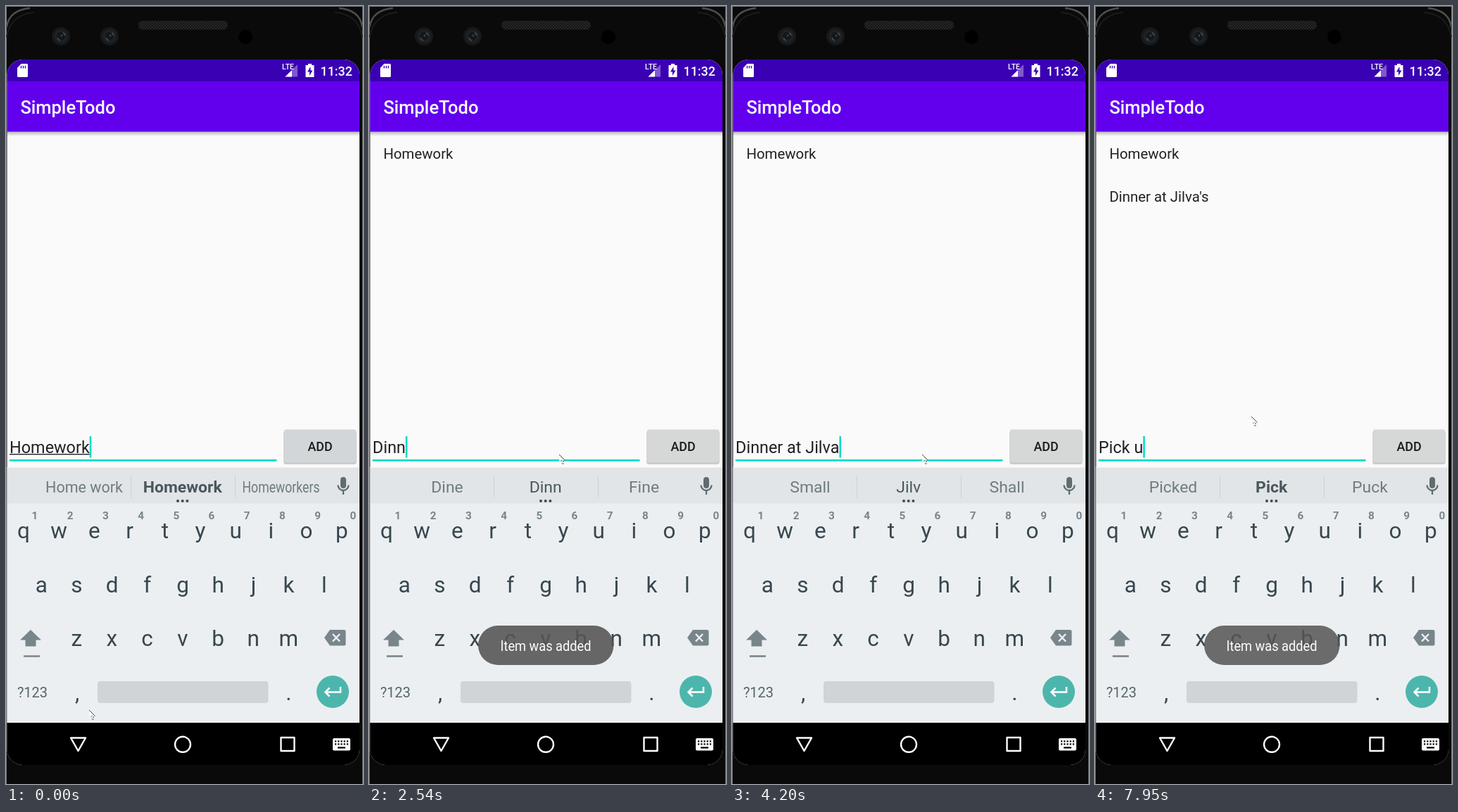
These frames come from a looping animation (507 px wide and 1105 px high, 8000 ms). An HTML page:

```html
<!DOCTYPE html>
<html lang="en">
<head>
<meta charset="utf-8">
<title>SimpleTodo</title>
<style>
  html, body { margin: 0; width: 100%; height: 100%; overflow: hidden; background: #0a0a0a; }
  svg { display: block; width: 100%; height: 100%; }
  text { font-family: Roboto, "Noto Sans", sans-serif; white-space: pre; }
  .mid { text-anchor: middle; }
  .med { font-weight: 500; }
  .key { font-size: 31.5px; fill: #37474f; }
  .num { font-size: 15.3px; font-weight: 700; fill: #78848a; }
  .item { font-size: 20.4px; fill: #212121; }
  .field { font-size: 23.4px; fill: #212121; }
  .sug { font-size: 22.96px; fill: #6f7b80; }
  .nav { fill: none; stroke: #fff; stroke-width: 2.4; stroke-linejoin: round; }
</style>
</head>
<body>
<svg viewBox="0 0 507 1105" preserveAspectRatio="none">
  <defs>
    <clipPath id="screen"><rect x="1.5" y="76" width="500.5" height="1002" rx="22"/></clipPath>
    <linearGradient id="shade" x2="0" y2="1">
      <stop stop-color="#000" stop-opacity=".28"/><stop offset="1" stop-color="#000" stop-opacity="0"/>
    </linearGradient>
    <pattern id="mesh" width="4" height="4" patternUnits="userSpaceOnUse">
      <rect width="4" height="4" fill="#292929"/><path d="M0 0l4 4M4 0L0 4" stroke="#141414"/>
    </pattern>
    <g id="lens">
      <circle r="13" fill="#17191b"/><circle r="9.5" fill="#1e2225"/><circle r="6" fill="#14171a"/>
      <path d="M-5 2a6 6 0 0 0 4 4M3-5a6 6 0 0 1 3 4" fill="none" stroke="#4a4f54" stroke-width="1.5"/>
      <circle cx="1" cy="-1" r="1.5" fill="#3b4248"/>
    </g>
  </defs>

  <!-- phone body -->
  <rect width="507" height="1105" fill="#0a0a0a"/>
  <path d="M.5 1105V.5H506.5V1105" fill="none" stroke="#77797a"/>
  <path d="M1 30Q4 6 34 3M506 30Q503 6 473 3" fill="none" stroke="#4c4d4e" stroke-width="2.5"/>
  <path d="M1 44Q6 12 40 9M506 44Q501 12 467 9" fill="none" stroke="#1b1b1b" stroke-width="2"/>
  <rect x="188" y="21" width="127" height="12.5" rx="6" fill="url(#mesh)"/>
  <use href="#lens" x="78" y="43"/><use href="#lens" x="147" y="43"/>
  <circle cx="340" cy="44" r="10" fill="#000"/>

  <g clip-path="url(#screen)">
    <rect y="76" width="507" height="1002" fill="#fafafa"/>
    <!-- app bar -->
    <rect y="178" width="507" height="7" fill="url(#shade)"/>
    <rect y="76" width="507" height="31" fill="#3a00b3"/>
    <rect y="107" width="507" height="71.5" fill="#6200ee"/>
    <text x="20.4" y="152.7" class="med" font-size="25.5" fill="#fff">SimpleTodo</text>
    <text x="446.5" y="98.5" class="med" font-size="17.9" fill="#fff">11:32</text>
    <path d="M21.5 82H29.5Q31 82 31 83.500V99.500Q31 101 29.500 101H17.500Q16 101 16 99.500V88z" fill="#fff"/>
    <path d="M21.500 85v3.500M24.500 85v3.500M27.500 85v3.500" stroke="#3a00b3" stroke-width="1.4"/>
    <path d="M414 83V100.500H396.500z" fill="#fff" opacity=".35"/>
    <path d="M406 91V100.500H396.500z" fill="#fff"/>
    <rect x="391" y="81" width="14.500" height="10.500" fill="#3a00b3"/>
    <text id="lte" x="392" y="90" font-size="10.500" class="med" fill="#fff">LTE</text>
    <path d="M425.500 84H429V82H434V84H437.500V101H425.500z" fill="#fff"/>
    <path d="M432.500 86L428 93.500H431V99L435.500 91.500H432.500z" fill="#3a00b3"/>

    <!-- list and field -->
    <text class="item" x="20.4" y="217">Homework</text>
    <text class="item" x="20.4" y="278.200">Dinner at Jilva's</text>
    <rect x="5" y="644" width="379.500" height="2.600" fill="#03dac5"/>
    <text id="field" class="field" x="5.100" y="635"></text>
    <rect id="under" y="636" height="1.400" fill="#212121"/>
    <rect id="caret" y="611" width="2.500" height="30.500" fill="#03dac5"/>
    <rect x="394" y="603" width="104" height="48.500" rx="4" fill="#000" opacity=".09"/>
    <rect x="394.500" y="603" width="103" height="47.200" rx="3" fill="#000" opacity=".16"/>
    <rect id="btn" x="395" y="601.500" width="102.200" height="47.300" rx="2.500"/>
    <text x="446" y="631.800" class="mid med" font-size="17.86" fill="#1b1b1b">ADD</text>

    <!-- keyboard -->
    <rect y="655" width="507" height="52" fill="#e1e5e8"/>
    <path d="M0 655.500H507" stroke="#eceeef"/>
    <rect y="706.500" width="507" height="312" fill="#eceff1"/>
    <path d="M177.500 667V698M325.500 667V698" stroke="#cbd1d4"/>
    <text class="sug mid"></text><text class="sug mid"></text><text class="sug mid"></text>
    <g id="dots" fill="#3f4c52">
      <circle cx="244" cy="703" r="2"/><circle cx="250.700" cy="703" r="2"/><circle cx="257.400" cy="703" r="2"/>
    </g>
    <g fill="none" stroke="#626c70" stroke-width="2.300">
      <rect x="475" y="669" width="8" height="16" rx="4" fill="#626c70" stroke="none"/>
      <path d="M471.500 680.500A7.500 7.500 0 0 0 486.500 680.500M479 688V694"/>
    </g>
    <g id="keys"></g>
    <path d="M35 886L50 900.500H42.500V909.500H27.500V900.500H20z" fill="#78868c"/>
    <path d="M25 923.500H48" stroke="#78868c" stroke-width="2.600"/>
    <path d="M460 886H480Q482.500 886 482.500 888.500V906Q482.500 908.500 480 908.500H460L452 897.200z" fill="#78868c"/>
    <path d="M464 892L474 902.500M474 892L464 902.500" stroke="#eceff1" stroke-width="2.500"/>
    <text x="37.500" y="981.500" class="mid" font-size="20" fill="#56656c">?123</text>
    <rect x="130" y="959" width="242.500" height="31" rx="4" fill="#d0d4d7"/>
    <circle cx="464" cy="974" r="23" fill="#4db6ac"/>
    <path d="M475 967V974.500H454M459.500 968.500L453.500 974.500L459.500 980.500" fill="none" stroke="#fff" stroke-width="2.500"/>

    <!-- toast -->
    <g id="toast">
      <rect x="155" y="880" width="192.500" height="56" rx="28" fill="#555" fill-opacity=".9"/>
      <text id="note" class="mid" font-size="20.400" fill="#fff">Item was added</text>
    </g>

    <!-- navigation -->
    <rect y="1018" width="507" height="60" fill="#000"/>
    <path class="nav" d="M92 1039.500H113L102.500 1058z"/>
    <circle class="nav" cx="251" cy="1048.800" r="11"/>
    <rect class="nav" x="390.500" y="1039" width="19" height="19"/>
    <rect x="464" y="1040" width="25" height="17.500" rx="2" fill="#fff"/>
    <path d="M467 1044.300H487M467 1048.300H487" stroke="#000" stroke-width="2.200" stroke-dasharray="2.200 2"/>
    <path d="M471 1053.300H482" stroke="#000" stroke-width="2.200"/>
  </g>

  <g id="pointer">
    <path d="M0 0V11.500L2.800 9L5 14L7 13L5 8.500H8.800z" fill="#fff" opacity=".8"/>
    <path d="M0 0L8.500 8.500M2.500 9.800L4.300 8M5 10.500L7 9.500M4 12L5.200 13.500L6.800 12.600" fill="none" stroke="#444"/>
  </g>
</svg>
<script>
const LOOP = 8000;
const $ = id => document.getElementById(id);
const sugs = document.querySelectorAll('.sug');
const items = document.querySelectorAll('.item');
const slots = [111, 250.7, 390.5];

// Each step lists only what changes at that time.
// sug: left, middle, right; heavy: middle word is bold; at: pointer tip
const steps = [
  [0, { text: 'Homework', caret: 1, under: 1, heavy: 1, sug: ['Home work', 'Homework', 'Homeworkers'],
        toast: 0, list: 0, btn: '#d3d6d9', at: [118, 1000] }],
  [400, { caret: 0, at: [206, 874] }],
  [520, { at: [295, 747] }],
  [670, { at: [400, 637] }],
  [820, { at: [452, 624] }],
  [1060, { btn: '#c6c8c9' }],
  [1180, { text: '', caret: 1, under: 0, sug: [], list: 1 }],
  [1300, { btn: '#d6d7d7', toast: .3, at: [410, 629] }],
  [1420, { toast: .75, at: [318, 635] }],
  [1570, { caret: 0, toast: .98, at: [270, 637] }],
  [2000, { text: 'D', caret: 1 }],
  [2150, { text: 'Di', heavy: 0, sug: ['Do', 'D', 'Dr'] }],
  [2270, { text: 'Din', sug: ['Do', 'Di', 'Did'] }],
  [2390, { sug: ['Don', 'Din', 'Fin'] }],
  [2540, { text: 'Dinn', sug: ['Dine', 'Dinn', 'Fine'] }],
  [2660, { text: 'Dinne' }],
  [2810, { text: 'Dinner', heavy: 1, sug: ['Winner', 'Dinner', 'Dinners'] }],
  [2930, { text: 'Dinner ' }],
  [3080, { text: 'Dinner a' }],
  [3230, { text: 'Dinner at', sug: [], toast: .74 }],
  [3350, { text: 'Dinner at ', toast: .3 }],
  [3500, { toast: 0 }],
  [3660, { text: 'Dinner at J', heavy: 0, sug: ['Is', 'J', 'is'] }],
  [3810, { text: 'Dinner at Ji', sug: ['Is', 'Ji', 'So'] }],
  [3960, { text: 'Dinner at Jil', sug: ['Sail', 'Jil', 'Small'] }],
  [4080, { text: 'Dinner at Jilv', sug: ['Small', 'Jilv', 'Shall'] }],
  [4200, { text: 'Dinner at Jilva' }],
  [4350, { under: 1, heavy: 1, sug: ['Jilvas', 'Jilva', 'Jilvanic'] }],
  [4780, { text: "Dinner at Jilva'", under: 0 }],
  [4910, { text: "Dinner at Jilva's" }],
  [5060, { under: 1, sug: ["Rilva's", "Jilva's", "Jilve's"] }],
  [5490, { caret: 0, at: [402, 634] }],
  [5610, { at: [473, 620] }],
  [5880, { btn: '#c6c8c9' }],
  [6000, { text: '', caret: 1, under: 0, sug: [], list: 2 }],
  [6120, { btn: '#d6d7d7', toast: .4, at: [325, 602] }],
  [6270, { toast: .9, at: [248, 590] }],
  [6390, { caret: 0, toast: 1, at: [222, 583] }],
  [6920, { caret: 1 }],
  [7320, { text: 'P' }],
  [7440, { text: 'Pi', heavy: 0, sug: ['I', 'P', 'Pm'] }],
  [7560, { text: 'Pic', sug: ['Pin', 'Pi', 'Pie'] }],
  [7680, { text: 'Pick', sug: ['Pick', 'Pic', 'Pics'] }],
  [7800, { under: 1, heavy: 1, sug: ['Picked', 'Pick', 'Puck'] }],
  [7950, { text: 'Pick u', under: 0, toast: .94 }]
];

let sum = {};
const states = steps.map(([, change]) => sum = { ...sum, ...change });

// Place text at x, y and condense it when it is wider than max.
function fit(el, x, y, max) {
  const len = el.getComputedTextLength();
  const k = len > max ? max / len : 1;
  el.setAttribute('transform', `translate(${x} ${y}) scale(${k} 1)`);
}

function label(cls, x, y, str) {
  const el = document.createElementNS('http://www.w3.org/2000/svg', 'text');
  el.setAttribute('class', cls + ' mid');
  el.setAttribute('x', x);
  el.setAttribute('y', y);
  el.textContent = str;
  $('keys').append(el);
}

function row(cls, str, x, y) {
  [...str].forEach((c, i) => label(cls, x + i * 50.2, y, c));
}

row('num', '1234567890', 41, 729);
row('key', 'qwertyuiop', 25, 756);
row('key', 'asdfghjkl', 50.2, 832.5);
row('key', 'zxcvbnm', 100.2, 909);
label('key', 101, 986, ',');
label('key', 401.5, 986, '.');
fit($('note'), 251, 916, 129);

function show(id, on) {
  $(id).style.display = on ? '' : 'none';
}

function draw(s) {
  const field = $('field');
  field.textContent = s.text || 'Add item here';
  field.style.fill = s.text ? '' : '#999';
  const end = s.text ? field.getComputedTextLength() : 0;
  const cut = s.text.lastIndexOf(' ') + 1;
  const start = s.text && cut ? field.getSubStringLength(0, cut) : 0;
  $('under').setAttribute('x', 5.1 + start);
  $('under').setAttribute('width', end - start);
  $('caret').setAttribute('x', 5.1 + end);
  show('under', s.under);
  show('caret', s.caret);

  sugs.forEach((el, i) => {
    const mid = i === 1;
    el.textContent = s.sug[i] || '';
    el.style.fontWeight = mid && s.heavy ? 700 : 400;
    el.style.fill = mid ? '#4a575d' : '';
    fit(el, slots[i], 691, mid ? 140 : 110);
  });
  show('dots', s.sug.length);

  items.forEach((el, i) => el.style.display = i < s.list ? '' : 'none');
  $('btn').setAttribute('fill', s.btn);
  $('toast').setAttribute('opacity', s.toast);
  $('pointer').setAttribute('transform', `translate(${s.at})`);
}

let last = -1;
const origin = performance.now();
function tick() {
  const t = (performance.now() - origin) % LOOP;
  let i = steps.length - 1;
  while (steps[i][0] > t) i--;
  if (i !== last) draw(states[last = i]);
  requestAnimationFrame(tick);
}
tick();
</script>
</body>
</html>
```
